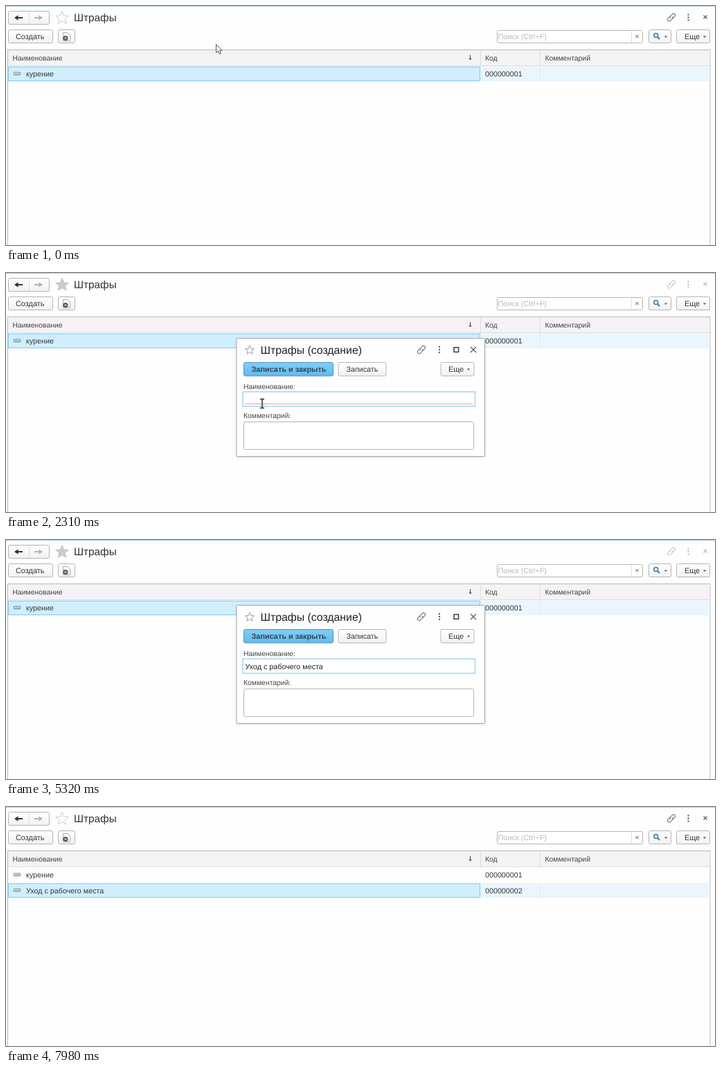
An HTML page that plays this animation: 1024x346 px, repeating every 8400 ms.

```html
<!DOCTYPE html>
<html lang="ru">
<head>
<meta charset="utf-8">
<title>Штрафы</title>
<style>
html, body { margin: 0; width: 100%; height: 100%; overflow: hidden; background: #fefefe; }
svg { display: block; width: 1024px; height: 346px; }
text { font: 10.72px "Liberation Sans", Arial, sans-serif; fill: #363636; white-space: pre; text-rendering: geometricPrecision; }
.head { font-size: 10.4px; fill: #444; }
.cap { font-size: 10.9px; }
.title { font-size: 15.3px; fill: #333; }
.big { font-size: 15.8px; fill: #222; }
.btn { fill: url(#face); stroke: #b4b4b4; }
.line { fill: none; stroke: #ddd; }
.down { fill: #e3e3e3; stroke: #666; }
.main { fill: url(#blue); stroke: #4b95bd; }
.main.down { fill: #70c3ef; stroke: #4c84a3; }
</style>
</head>
<body>
<svg viewBox="0 0 1024 346">
  <defs>
    <linearGradient id="face" x2="0" y2="1"><stop stop-color="#fff"/><stop offset="1" stop-color="#f1f1f1"/></linearGradient>
    <linearGradient id="blue" x2="0" y2="1"><stop stop-color="#82cef6"/><stop offset="1" stop-color="#62b9ea"/></linearGradient>
    <filter id="shade" x="-5%" y="-5%" width="110%" height="115%"><feDropShadow dx="0" dy="1" stdDeviation="1.6" flood-opacity=".16"/></filter>
    <g id="link" fill="none" stroke="currentColor" stroke-width="1.1" opacity=".8">
      <g transform="rotate(-45)"><path d="M-1 -2.4H-4.4a2.4 2.4 0 0 0 0 4.8H-.6a2.4 2.4 0 0 0 2.2 -2.4M1 2.4H4.4a2.4 2.4 0 0 0 0 -4.8H.6a2.4 2.4 0 0 0 -2.2 2.4"/></g>
    </g>
    <g id="dots" fill="currentColor"><circle cy="-4" r="1.15"/><circle r="1.15"/><circle cy="4" r="1.15"/></g>
    <path id="drop" d="M-2.2 -1H2.2L0 1.5Z" fill="#555"/>
    <path id="star" d="M0 -9.5 2.6 -3 9.3 -2.6 4.1 1.7 5.9 8.3 0 4.6 -5.9 8.3 -4.1 1.7 -9.3 -2.6 -2.6 -3Z"/>
    <g id="item"><rect x="11.5" y="-2.5" width="9" height="3.6" rx=".6" fill="#fff" stroke="currentColor" stroke-width="1.2"/><path d="M13 -.7H19" stroke="currentColor"/></g>
  </defs>

  <rect width="1024" height="346" fill="#fefefe"/>
  <path d="M0 .5H1024" stroke="#b4c9da"/>

  <rect class="btn" x="3.5" y="7.5" width="59" height="19" rx="2"/>
  <path class="line" d="M33.5 8V26" stroke="#c8c8c8"/>
  <path d="M16 17H24" stroke="#333" stroke-width="2"/><path d="M12 17 17.5 13.2V20.8Z" fill="#333"/>
  <path d="M41 17H49" stroke="#b3b3b3" stroke-width="2"/><path d="M53 17 47.5 13.2V20.8Z" fill="#b3b3b3"/>
  <use id="fav" href="#star" x="81" y="17"/>
  <text class="title" x="98" y="22.3">Штрафы</text>
  <g id="tools">
    <use href="#link" x="961" y="16.5"/><use href="#dots" x="985.5" y="16.5"/>
    <path d="M1007.5 13.5 1012.500 18.500M1012.500 13.500 1007.500 18.500" stroke="currentColor" stroke-width="1.1"/>
  </g>

  <rect id="create" class="btn" x="3.5" y="34.5" width="64" height="19" rx="2"/>
  <text class="cap" x="14" y="48">Создать</text>
  <rect class="btn" x="75.5" y="34.5" width="24" height="19" rx="2"/>
  <path d="M82.5 38.5H88.5L92.5 42V50.5H82.5Z" fill="#fff" stroke="#aaa"/>
  <circle cx="86" cy="46.5" r="3.6" fill="#555"/><path d="M84.3 46.5H87.7M86 44.8V48.2" stroke="#ddd"/>

  <rect x="709.5" y="35.5" width="210" height="18" rx="2" fill="#fff" stroke="#b4b4b4"/>
  <path class="line" d="M903.5 36V53" stroke="#c4c4c4"/>
  <text class="cap" x="710.5" y="48" style="fill:#b9b9b9">Поиск (Ctrl+F)</text>
  <path d="M909.3 41.8 913.7 46.2M913.7 41.8 909.3 46.2" stroke="#555"/>
  <rect class="btn" x="928.5" y="34.5" width="32" height="19" rx="2"/>
  <circle cx="938.7" cy="42.6" r="3" fill="#dff0fb" stroke="#3a7ca8" stroke-width="1.5"/>
  <path d="M941 45 944 48" stroke="#3a7ca8" stroke-width="2"/>
  <use href="#drop" x="953" y="44.5"/>
  <rect class="btn" x="968.5" y="34.5" width="48" height="19" rx="2"/>
  <text class="cap" x="980" y="48">Еще</text><use href="#drop" x="1009" y="44.5"/>

  <rect x="2.5" y="63.5" width="1014.5" height="300" fill="#fefefe" stroke="#b8b8b8"/>
  <rect x="3" y="64" width="1013.5" height="22.5" fill="#f4f2f5"/>
  <path class="line" d="M3 86.5H1016.5M685.5 64V87M771.5 64V87" stroke="#d3d3d3"/>
  <text class="head" x="9.5" y="78.5">Наименование</text>
  <text class="head" x="692" y="78.5">Код</text>
  <text class="head" x="778.5" y="78.5">Комментарий</text>
  <path d="M670.5 71V78M668.6 75.7 670.5 78 672.4 75.7" fill="none" stroke="#444"/>
  <g id="pick">
    <rect x="3" y="87.5" width="1013.5" height="21.5" fill="#eaf5fd"/>
    <path d="M771.5 88V109" stroke="#dfeaf2"/>
    <rect x="3.5" y="88.4" width="681" height="20" fill="#d1eefd" stroke="#8ad3f5" stroke-width="1.2"/>
  </g>
  <g id="items">
    <use href="#item" y="98.5"/><text x="29" y="102.3">курение</text><text x="692" y="102.3">000000001</text>
    <g id="added"><use href="#item" y="121"/><text x="29" y="124.8">Уход с рабочего места</text><text x="692" y="124.8">000000002</text></g>
  </g>

  <g id="dialog">
    <rect id="back" x="333" y="94.5" width="358.5" height="171" fill="#fefefe"/>
    <rect id="frame" x="333" y="94.5" width="358.5" height="171" rx="1" fill="#fefefe" stroke="#a9a9a9" filter="url(#shade)"/>
    <g id="parts">
      <use href="#star" transform="translate(352 111.5) scale(.69)" fill="none" stroke="#999" stroke-width="1.4"/>
      <text id="name" class="big" x="367.5" y="117">Штрафы (создание)</text>
      <g color="#555"><use href="#link" x="600" y="111"/><use href="#dots" x="626" y="111"/></g>
      <rect x="647" y="107.8" width="6.6" height="6.6" fill="none" stroke="#333" stroke-width="1.4"/>
      <path d="M671 107 679 115M679 107 671 115" stroke="#555" stroke-width="1.1"/>
      <rect id="save" class="main" x="343.5" y="129.5" width="129" height="19.5" rx="2"/>
      <text class="cap" x="354.5" y="143" style="font-weight:700;fill:#2f4654">Записать и закрыть</text>
      <rect class="btn" x="480" y="129.5" width="69" height="19.5" rx="2"/>
      <text x="491.5" y="143">Записать</text>
      <rect class="btn" x="628" y="129.5" width="48" height="19.5" rx="2"/>
      <text class="cap" x="639" y="143">Еще</text><use href="#drop" x="668" y="139.5"/>
      <text class="head" x="343" y="168">Наименование:</text>
      <rect x="342" y="172" width="335.5" height="21" fill="#fff" stroke="#8ccbee" stroke-width="1.2"/>
      <path id="need" d="M345 189.5H674" stroke="#e3a3a3"/>
      <text id="entry" x="345.5" y="186.7" style="fill:#222"></text>
      <path id="caret" d="M0 177V188.5" stroke="#111" stroke-width="1.3"/>
      <text class="head" x="343" y="209.8">Комментарий:</text>
      <rect x="343.5" y="215.5" width="332" height="40" rx="2" fill="#fff" stroke="#b4b4b4"/>
    </g>
  </g>

  <g id="pointer">
    <path id="arrow" d="M.5 .5V12.5L3.2 10 5.3 14.5 7.3 13.6 5.3 9.3H9Z" fill="#fff" stroke="#555"/>
    <path id="beam" d="M-3 -6.5H-1L0 -5.7 1 -6.5H3M0 -5.7V5.7M-3 6.5H-1L0 5.7 1 6.5H3" fill="none" stroke="#222" stroke-width="1.4"/>
    <g id="busy" fill="none"><circle r="5.8" stroke="#d5eafa" stroke-width="3.4"/><circle r="5.8" stroke="#64ade0" stroke-width="2.6" stroke-dasharray="5 1.1"/></g>
  </g>
</svg>
<script>
const LOOP = 8400, STEP = 70, PHRASE = 'Уход с рабочего места';
const el = {};
document.querySelectorAll('svg [id]').forEach(n => el[n.id] = n);

// pointer stops: time, x, y
const path = [
  [0, 303, 55], [280, 303, 55], [700, 62, 51], [840, 62, 51], [1050, 40, 44],
  [1610, 40, 44], [2240, 370, 189], [2520, 370, 189], [2660, 374, 197], [2730, 374, 197],
  [2870, 424, 310], [3570, 429, 308], [3920, 429, 276], [4340, 429, 276], [4760, 468, 354],
  [5530, 468, 354], [6440, 438, 142], [7420, 438, 142], [7980, 735, 354], [LOOP, 735, 354]
];
const clamp = v => Math.max(0, Math.min(1, v));
const ramp = (t, a, b) => clamp((t - a) / (b - a));
const between = (t, a, b) => t >= a && t < b;
const show = (n, on) => n.setAttribute('visibility', on ? 'inherit' : 'hidden');

function pointerAt(t) {
  const i = path.findIndex((p, k) => t < path[k + 1][0]);
  const [a, x, y] = path[i], [b, u, v] = path[i + 1];
  const k = ramp(t, a, b), e = k * k * (3 - 2 * k);
  return [x + (u - x) * e, y + (v - y) * e];
}

function typed(t) {
  if (t < 3010) return 0;
  if (t < 3640) return Math.round(2 + 13 * ramp(t, 3010, 3360));
  return Math.round(16 + 5 * ramp(t, 3640, 3850));
}

function draw(t) {
  const open = between(t, 1470, 7210), modal = between(t, 1540, 7000), added = t >= 7000;

  el.fav.setAttribute('fill', modal ? '#cbcbcb' : 'none');
  el.fav.setAttribute('stroke', modal ? '#c2c2c2' : '#c9ced6');
  el.tools.setAttribute('color', modal ? '#bcbcbc' : '#555');
  el.items.setAttribute('color', between(t, 1540, 7910) ? '#628eaa' : '#8a8a8a');
  el.create.classList.toggle('down', between(t, 1330, 1610));
  show(el.added, added);
  el.pick.setAttribute('transform', `translate(0 ${added ? 22.5 : 0})`);

  // the border and contents fade ahead of the white sheet
  show(el.dialog, open);
  const inn = ramp(t, 1400, 1680), out = ramp(t, 6930, 7210);
  const size = 1 - .02 * (1 - inn) - .02 * out;
  el.back.setAttribute('opacity', inn * (1 - out ** 3));
  el.frame.setAttribute('opacity', inn * (1 - out) ** 2.5);
  el.parts.setAttribute('opacity', inn * (1 - out));
  el.dialog.setAttribute('transform', `translate(512.3 180) scale(${size}) translate(-512.3 -180)`);
  el.name.textContent = 'Штрафы (создание)' + (t >= 6510 ? ' *' : '');
  el.save.classList.toggle('down', t >= 6580);

  const count = typed(t);
  el.entry.textContent = PHRASE.slice(0, count);
  show(el.need, open && !count);
  const caret = between(t, 3010, 4200) || between(t, 4410, 5320) || between(t, 5600, 6160) || t >= 6440;
  show(el.caret, open && caret);
  el.caret.setAttribute('transform', `translate(${346 + el.entry.getComputedTextLength()} 0)`);

  const [x, y] = pointerAt(t);
  const busy = between(t, 1330, 1610);
  const field = open && x > 342 && x < 677 && (between(y, 172, 194) || between(y, 215, 256));
  el.pointer.setAttribute('transform', `translate(${x} ${y})`);
  show(el.busy, busy);
  show(el.beam, field && !busy);
  show(el.arrow, !field && !busy);
  el.busy.setAttribute('transform', `rotate(${t * .5})`);
}

function tick() {
  const t = performance.now() % LOOP;
  draw(Math.floor(t / STEP) * STEP);
  requestAnimationFrame(tick);
}
tick();
</script>
</body>
</html>
```
